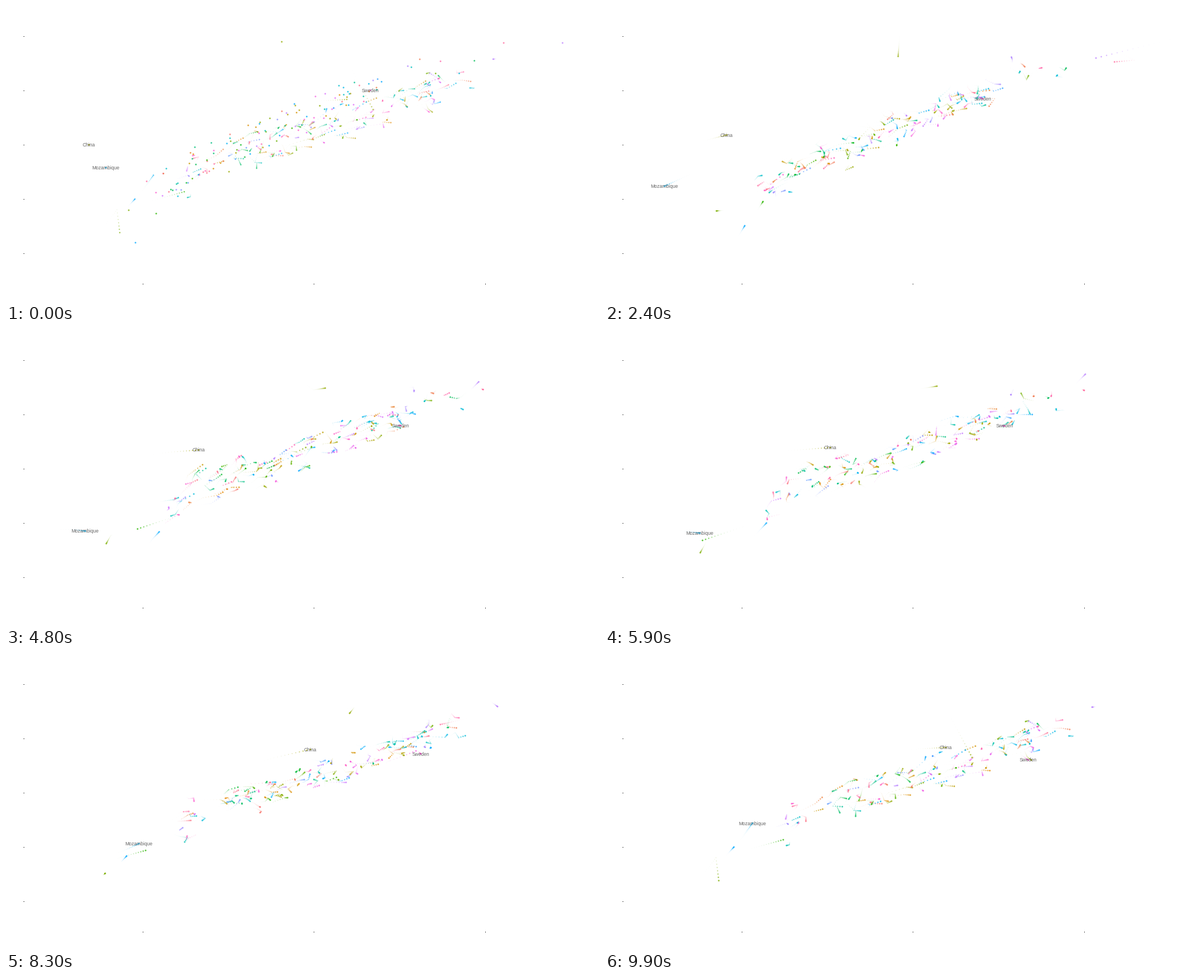
Recreate the animation shown at these times as a matplotlib script. Size 1058 px wide and 529 px high, loop 10 s.

```python
import numpy as np
import matplotlib.pyplot as plt
from matplotlib.animation import FuncAnimation
from matplotlib.patches import Rectangle

W, H, DPI = 1058, 529, 100
PX = 72 / DPI
FRAMES, INTERVAL, WAKE = 100, 100, 20
CROWD, RICH = 112, 8

rng = np.random.default_rng(4)
time = np.arange(FRAMES)
progress = time / (FRAMES - 1)


def hcl(hue, chroma=100, light=65):
    """Polar LUV colours converted to sRGB."""
    a = np.radians(np.asarray(hue, float))
    u = chroma * np.cos(a) / (13 * light) + 0.1978
    v = chroma * np.sin(a) / (13 * light) + 0.4683
    y = ((light + 16) / 116) ** 3 * np.ones_like(u)
    x = y * 9 * u / (4 * v)
    z = y * (12 - 3 * u - 20 * v) / (4 * v)
    m = np.array([[3.2406, -1.5372, -0.4986],
                  [-0.9689, 1.8758, 0.0415],
                  [0.0557, -0.2040, 1.0570]])
    lin = np.clip(np.stack([x, y, z], -1) @ m.T, 0, 1)
    return np.where(lin <= 0.0031308, 12.92 * lin,
                    1.055 * lin ** (1 / 2.4) - 0.055)


def wander(amount, step=5):
    """Random drift in straight runs, pulled back towards zero."""
    nodes = np.arange(0, FRAMES + step, step)
    value, walk = 0, []
    for kick in rng.normal(0, amount, len(nodes)):
        value = 0.75 * value + kick
        walk.append(value)
    return np.interp(time, nodes, walk)


def track(stops):
    """Straight runs between a few timed points."""
    frames = sorted(stops)
    return np.stack([np.interp(time, frames, [stops[f][i] for f in frames])
                     for i in (0, 1)], -1)


def crowd_path(u):
    """One point of the crowd, moving along the rising diagonal."""
    u_end = np.clip(u ** 0.8 + rng.normal(0, 0.06), 0, 1)
    x = ((1 - progress) * (264 + 400 * u) + progress * (310 + 465 * u_end)
         + wander(10))
    base = np.interp(progress, [0, 0.25, 0.6, 1], [305, 314, 300, 311])
    slope = np.interp(progress, [0, 0.25, 0.6, 1], [0.47, 0.42, 0.35, 0.345])
    spread = 38 - 16 * u
    side = np.interp(progress, [0, 0.5, 1], spread * rng.uniform(-1, 1, 3))
    return np.stack([x, base - slope * (x - 300) + side + wander(4)], -1)


def rich_path():
    """A point at the upper right, settling as time goes on."""
    start = rng.uniform((660, 80), (850, 135))
    end = rng.uniform((740, 112), (840, 165))
    line = start + (end - start) * progress[:, None]
    return line + np.stack([wander(8), wander(5)], -1)


labelled = {
    "China": (88, track({0: (148, 248), 24: (217, 230.5), 38: (290, 218.5),
                         59: (402, 210), 73: (478, 185.5), 83: (543, 170.5),
                         99: (608, 167)})),
    "Mozambique": (230, track({0: (178, 289), 24: (106, 322), 30: (80, 358),
                               38: (116, 356), 59: (169, 363), 73: (209, 352),
                               83: (237, 339), 99: (263, 302.5)})),
    "Sweden": (325, track({0: (650, 150.5), 24: (674, 166), 38: (696, 170.5),
                           59: (713, 171.5), 73: (736, 174.5),
                           83: (740, 178.5), 99: (755, 189.5)})),
}

outliers = [
    (280, track({0: (993, 66), 10: (1008, 60), 24: (876, 93), 38: (831, 105),
                 59: (857, 79), 83: (877, 94), 99: (869, 95)})),
    (355, track({0: (888, 66), 16: (944, 97), 38: (848, 105), 59: (855, 108),
                 83: (775, 126), 99: (772, 130)})),
    (95, track({0: (492, 64), 8: (526, 48), 24: (523, 90), 38: (549, 107),
                73: (621, 96), 83: (613, 106), 99: (655, 185)})),
    (105, track({0: (219, 365), 38: (187, 367), 59: (170, 398),
                 83: (177, 392), 92: (198, 364), 99: (203, 405)})),
    (240, track({0: (231, 423), 38: (260, 375), 59: (288, 345),
                 73: (206, 371), 99: (230, 345)})),
    (125, track({0: (268, 371), 38: (290, 337), 59: (174, 376),
                 73: (206, 363), 99: (318, 332)})),
]

moving = [*labelled.values(), *outliers]
hues = rng.permutation(np.linspace(15, 375, CROWD + RICH, endpoint=False))
moving += [(hue, rich_path()) for hue in hues[:RICH]]
moving += [(hue, crowd_path((i + rng.random()) / CROWD))
           for i, hue in enumerate(hues[RICH:])]
colors = hcl([hue for hue, _ in moving])
paths = np.stack([path for _, path in moving], 1)

# Size and opacity of the trailing copies fall off cubically, oldest first.
ages = np.arange(WAKE)[::-1]
fade = (1 - ages / WAKE) ** 3
count = len(moving)
rgba = np.empty((WAKE, count, 4))
rgba[..., :3] = colors
rgba[..., 3] = 0.75 * fade[:, None]
sizes = np.repeat(((0.75 + 2.2 * fade) * PX) ** 2, count)

fig = plt.figure(figsize=(W / DPI, H / DPI), dpi=DPI, facecolor="white")
ax = fig.add_axes([0, 0, 1, 1])
ax.set(xlim=(0, W), ylim=(H, 0))
ax.axis("off")

for k in range(5):
    ax.add_patch(Rectangle((31, 54 + 97 * k), 2, 1, fc="#555555", lw=0))
for k in range(3):
    ax.add_patch(Rectangle((243.7 + 305.5 * k, 496), 1, 2,
                           fc="#555555", lw=0))

dots = ax.scatter(np.zeros(WAKE * count), np.zeros(WAKE * count), s=sizes,
                  c=rgba.reshape(-1, 4), linewidths=0)
texts = [ax.text(0, 0, name, family="Liberation Sans", size=8.54 * PX,
                 color="black", alpha=0.6, ha="center", va="baseline")
         for name in labelled]


def draw(frame):
    dots.set_offsets(paths[(frame - ages) % FRAMES].reshape(-1, 2))
    for text, (_, path) in zip(texts, labelled.values()):
        x, y = path[frame]
        text.set_position((x, y + 3))
    return [dots, *texts]


anim = FuncAnimation(fig, draw, frames=FRAMES, interval=INTERVAL,
                     repeat=True, repeat_delay=0, blit=False)
plt.show()
```
